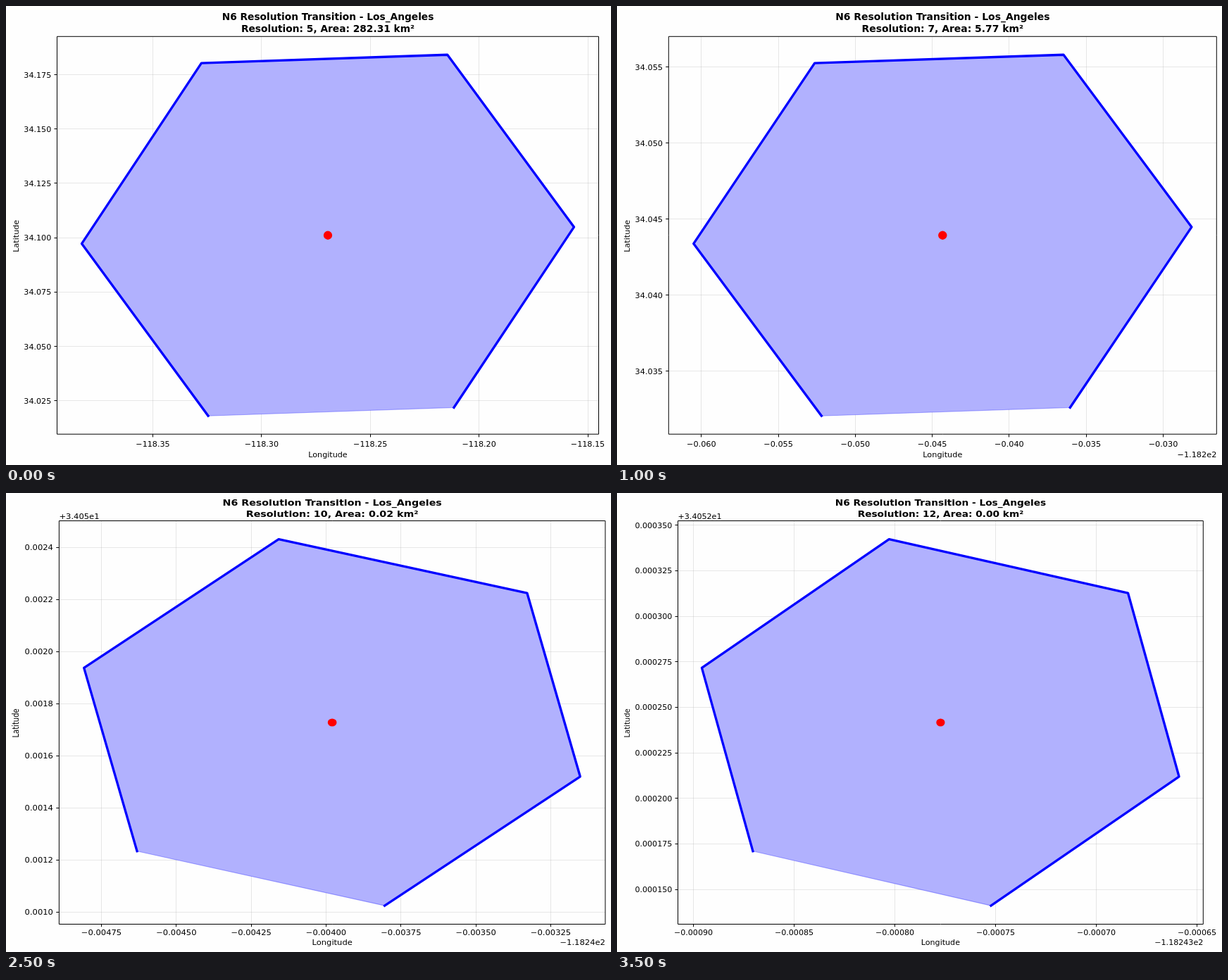
Animation of 859 by 652 pixels, one loop 4000 ms. Source, as an HTML page with a canvas:

```html
<!DOCTYPE html>
<html lang="en">
<head>
<meta charset="utf-8">
<title>Resolution transition</title>
<style>
  html, body { margin: 0; width: 100%; height: 100%; overflow: hidden; background: #fefefe; }
  canvas { display: block; }
</style>
</head>
<body>
<canvas id="stage" width="859" height="652"></canvas>
<script>
const ctx = document.getElementById('stage').getContext('2d');
const FRAME_MS = 500, FIRST_RESOLUTION = 5;
const LABEL = '11.15px "DejaVu Sans", sans-serif';
const TITLE = 'bold 13.75px "DejaVu Sans", sans-serif';

// Cell outlines as fractions of the plot box; the grid turns at every other resolution.
const FLAT = {
  top: 43.3, bottom: 608.2, width: 769, scaleY: 1,
  cell: [[.279, .954], [.0455, .521], [.2665, .067], [.7207, .046], [.9545, .479], [.7327, .933]],
};
const TURNED = {
  top: 39.5, bottom: 612.5, width: 749, scaleY: .902,
  cell: [[.1427, .819], [.0455, .3645], [.402, .0455], [.8568, .179], [.954, .634], [.596, .954]],
};

// Ticks: first value, step, count, first pixel, last pixel, decimals
const charts = [
  { area: '282.31', left: 72.5, right: 841.5,
    x: [-118.35, .05, 5, 208.5, 826, 2], y: [34.025, .025, 7, 560.5, 97.5, 3] },
  { area: '40.37', left: 68.5, right: 850.5,
    x: [-118.26, .01, 9, 112.7, 812, 2], y: [34.02, .01, 8, 600.6, 72, 2] },
  { area: '5.77', left: 73.3, right: 851.3, xOffset: '−1.182e2',
    x: [-.06, .005, 7, 119.8, 775.5, 3], y: [34.035, .005, 5, 518.3, 86.2, 3] },
  { area: '0.82', left: 75.4, right: 850.9, xOffset: '−1.182e2',
    x: [-.046, .002, 6, 161.4, 767.9, 3], y: [34.048, .002, 5, 553.9, 131, 3] },
  { area: '0.12', left: 79.2, right: 843.7, xOffset: '−1.1824e2',
    x: [-.006, .001, 5, 228.5, 830.5, 3], y: [34.049, .0005, 7, 557.5, 103.5, 4] },
  { area: '0.02', left: 75.4, right: 850.9, xOffset: '−1.1824e2', yOffset: '+3.405e1',
    x: [-.00475, .00025, 7, 135.5, 773.5, 5], y: [.001, .0002, 8, 595.5, 77.3, 4] },
  { area: '0.00', left: 73.5, right: 851.5, xOffset: '−1.1824e2', yOffset: '+3.405e1',
    x: [-.0043, .0001, 7, 129, 772, 4], y: [.002, .0001, 5, 538.5, 115, 4] },
  { area: '0.00', left: 86.5, right: 832.3, xOffset: '−1.18243e2', yOffset: '+3.4052e1',
    x: [-.0009, .00005, 6, 108.5, 823.5, 5], y: [.00015, .000025, 9, 563.3, 45.8, 6] },
];

const snap = v => Math.floor(v) + .5;

function ticks([first, step, count, from, to, decimals]) {
  return Array.from({ length: count }, (_, i) => ({
    at: from + (to - from) * i / (count - 1),
    label: (first + step * i).toFixed(decimals).replace('-', '−'),
  }));
}

function polyline(points, color, width, close) {
  ctx.beginPath();
  points.forEach(p => ctx.lineTo(...p));
  if (close) ctx.closePath();
  ctx.strokeStyle = color;
  ctx.lineWidth = width;
  ctx.stroke();
}

function drawChart(index) {
  const { area, left, right, x, y, xOffset, yOffset } = charts[index];
  const { top, bottom, width, scaleY, cell } = index % 2 ? TURNED : FLAT;
  const scaleX = (right - left) / width;
  const midX = (left + right) / 2, midY = (top + bottom) / 2;

  // The whole chart is scaled to the stage, lettering and marker included.
  function scaled(px, py, draw) {
    ctx.save();
    ctx.translate(px, py);
    ctx.scale(scaleX, scaleY);
    draw();
    ctx.restore();
  }
  function text(string, px, py, dx, dy, align = 'center', font = LABEL, angle = 0) {
    scaled(px, py, () => {
      ctx.translate(dx, dy);
      ctx.rotate(angle);
      ctx.font = font;
      ctx.textAlign = align;
      ctx.fillText(string, 0, 0);
    });
  }

  ctx.fillStyle = '#fefefe';
  ctx.fillRect(0, 0, 859, 652);
  ctx.lineJoin = 'round';
  ctx.lineCap = 'butt';

  const xTicks = ticks(x), yTicks = ticks(y);
  const grid = 'rgba(176,176,176,.3)';
  xTicks.forEach(t => polyline([[snap(t.at), top], [snap(t.at), bottom]], grid, 1));
  yTicks.forEach(t => polyline([[left, snap(t.at)], [right, snap(t.at)]], grid, 1));

  const points = cell.map(([u, v]) => [left + u * (right - left), top + v * (bottom - top)]);
  ctx.beginPath();
  points.forEach(p => ctx.lineTo(...p));
  ctx.fillStyle = '#b1b1fe';
  ctx.fill();
  polyline(points, 'rgba(0,0,255,.3)', 1.1, true);
  ctx.lineCap = 'square';
  polyline(points, '#00f', 3.35);
  ctx.lineCap = 'butt';

  ctx.fillStyle = '#f00';
  scaled(midX, midY, () => {
    ctx.beginPath();
    ctx.arc(0, 0, 6.15, 0, 2 * Math.PI);
    ctx.fill();
  });

  polyline([[left, top], [right, top], [right, bottom], [left, bottom]], '#000', 1, true);
  ctx.fillStyle = '#000';
  xTicks.forEach(({ at, label }) => {
    polyline([[snap(at), bottom], [snap(at), bottom + 4.2 * scaleY]], '#000', 1);
    text(label, at, bottom, 0, 17.4);
  });
  yTicks.forEach(({ at, label }) => {
    polyline([[left - 4 * scaleX, snap(at)], [left, snap(at)]], '#000', 1);
    text(label, left, at, -8.2, 4.3, 'right');
  });

  text('Longitude', midX, bottom, 0, 32.5);
  text('Latitude', 0, midY, 17.7, 1, 'center', LABEL, -Math.PI / 2);
  if (xOffset) text(xOffset, right, bottom, 0, 32.4, 'right');
  if (yOffset) text(yOffset, left, top, 0, -3.2, 'left');
  text('N6 Resolution Transition - Los_Angeles', midX, top, 0, -23.5, 'center', TITLE);
  text(`Resolution: ${FIRST_RESOLUTION + index}, Area: ${area} km²`, midX, top, 0, -6.4, 'center', TITLE);
}

function tick() {
  drawChart(Math.floor(performance.now() / FRAME_MS) % charts.length);
  requestAnimationFrame(tick);
}
tick();
</script>
</body>
</html>
```
